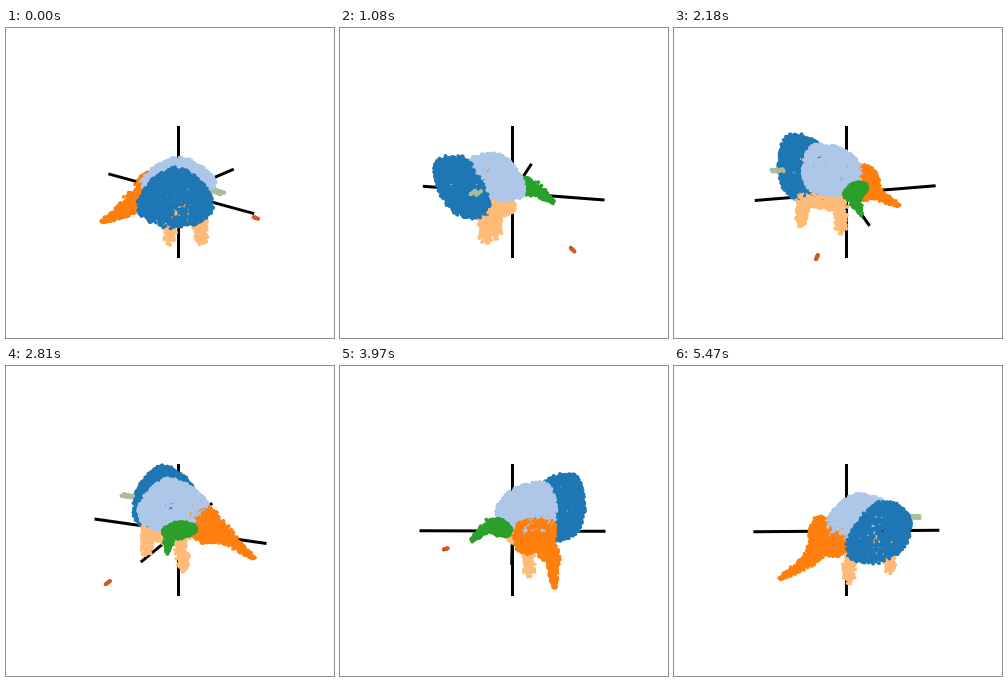
An HTML page with a canvas for the animation above (5.8 s loop, 328 by 310 pixels).

```html
<!DOCTYPE html>
<html lang="en">
<head>
<meta charset="utf-8">
<title>Rotating point cloud</title>
<style>
html, body { margin: 0; width: 100%; height: 100%; overflow: hidden; background: #fff; }
canvas { display: block; }
</style>
</head>
<body>
<canvas id="stage" width="328" height="310"></canvas>
<script>
const ctx = document.getElementById('stage').getContext('2d');
const radians = degrees => degrees * Math.PI / 180;
const LOOP = 5800, STEP = 68.4, LAST = 80, DEGREES_PER_STEP = 4;
const CX = 172.5, CY = 165, CAMERA = 1430, ELEVATION = radians(20);
const AXIS = 93, AXIS_ANGLE = 38.5;

const BLUE = '#1f77b4', SKY = '#aec7e8', ORANGE = '#ff7f0e', PEACH = '#ffbb78';
const GREEN = '#2ca02c', SAGE = '#a9bd9a', RUST = '#cf5a22';

let seed = 7;
function random() {
  seed = (seed * 16807) % 2147483647;
  return seed / 2147483647;
}

const points = [];

function randomDirection() {
  const up = random() * 2 - 1, a = random() * 2 * Math.PI;
  return { up, ring: Math.sqrt(1 - up * up), cos: Math.cos(a), sin: Math.sin(a) };
}

// Fuzzy shell, boxy along y; lean shifts y with height, taper narrows x.
function blob(color, count, [x, y, z], [rx, ry, rz], lean = 0, taper = 0) {
  for (let i = 0; i < count; i++) {
    const { up, ring, cos, sin } = randomDirection(), k = 0.8 + 0.25 * random();
    points.push({
      color,
      x: x + rx * k * ring * cos * (1 - taper * up),
      y: y + ry * k * Math.sqrt(ring) * sin + lean * rz * up,
      z: z + rz * k * up
    });
  }
}

// Solid rod between two places whose radius runs from r0 to r1.
function rod(color, count, from, to, r0 = 0, r1 = r0) {
  for (let i = 0; i < count; i++) {
    const t = random(), r = (r0 + (r1 - r0) * t) * Math.sqrt(random());
    const { up, ring, cos, sin } = randomDirection();
    const [x, y, z] = from.map((v, j) => v + (to[j] - v) * t);
    points.push({ color, x: x + r * ring * cos, y: y + r * ring * sin, z: z + r * up });
  }
}

blob(BLUE, 2000, [-3, 55, 15], [34, 21, 31], 0.33, 0.3);
blob(SKY, 2000, [0, 19, 21], [34, 23, 22], 0.4, 0.3);
blob(ORANGE, 750, [-28, 6, 3], [15, 23, 18]);
blob(PEACH, 600, [5, 25, -10], [16, 24, 9]);
blob(GREEN, 400, [3, -14, 6], [17, 6, 8]);

const elbow = [-56, 7, -17], tailTip = [-77, -9, -34];
rod(ORANGE, 280, [-36, 8, 0], elbow, 15, 8);
rod(ORANGE, 160, elbow, tailTip, 8, 2);
rod(PEACH, 240, [20, 38, -8], [23, 41, -34], 9, 6);
rod(PEACH, 260, [-7, 14, -10], [-9, 14, -46], 9, 6);
rod(GREEN, 180, [14, -19, 6], [21, -34, -8], 8, 2);
rod(RUST, 14, [76, -25, -35], [82, -27, -38]);
for (const side of [-2, 2]) rod(SAGE, 14, [34 + side, 53 - side, 22], [42 + side, 62 - side, 22]);

function project({ x, y, z, color }, turn) {
  const side = x * Math.cos(turn) - y * Math.sin(turn);
  const front = x * Math.sin(turn) + y * Math.cos(turn);
  const depth = front * Math.cos(ELEVATION) + z * Math.sin(ELEVATION);
  const scale = CAMERA / (CAMERA - depth);
  return {
    color, depth,
    x: CX + side * scale,
    y: CY + (front * Math.sin(ELEVATION) - z * Math.cos(ELEVATION)) * scale
  };
}

function axisEnd(degrees, turn) {
  const a = radians(degrees);
  return project({ x: AXIS * Math.cos(a), y: AXIS * Math.sin(a), z: 0 }, turn);
}

function draw(turn) {
  ctx.fillStyle = '#fff';
  ctx.fillRect(0, 0, 328, 310);

  ctx.lineWidth = 3;
  ctx.beginPath();
  ctx.moveTo(CX, 98);
  ctx.lineTo(CX, 230);
  for (const angle of [AXIS_ANGLE, AXIS_ANGLE + 90]) {
    const a = axisEnd(angle, turn), b = axisEnd(angle + 180, turn);
    ctx.moveTo(a.x, a.y);
    ctx.lineTo(b.x, b.y);
  }
  ctx.stroke();

  const dots = points.map(p => project(p, turn)).sort((a, b) => a.depth - b.depth);
  for (const dot of dots) {
    ctx.fillStyle = dot.color;
    ctx.beginPath();
    ctx.arc(dot.x, dot.y, 1.9, 0, 2 * Math.PI);
    ctx.fill();
  }
}

let shown = -1;
function tick() {
  const step = Math.min(LAST, Math.floor(performance.now() % LOOP / STEP + 0.35));
  if (step !== shown) draw(radians(DEGREES_PER_STEP * step));
  shown = step;
  requestAnimationFrame(tick);
}
tick();
</script>
</body>
</html>
```
